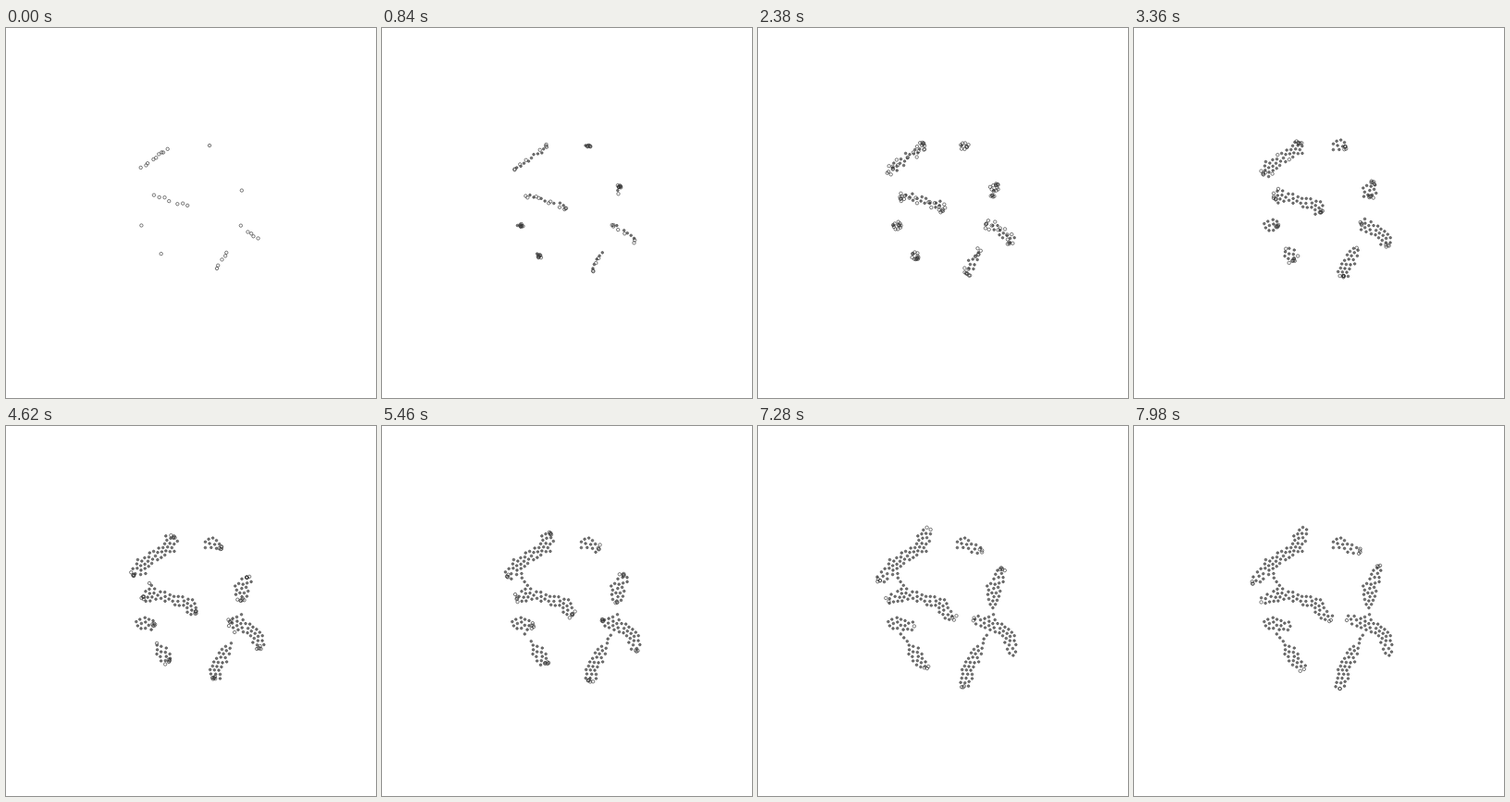
Write an HTML page with a canvas that moves like this. It is 400 by 400 pixels and loops after 8 s.

```html
<!DOCTYPE html>
<html>
<head>
<meta charset="utf-8">
<style>
html, body { margin: 0; width: 100%; height: 100%; overflow: hidden; background: #fff; }
canvas { display: block; width: 400px; height: 400px; }
</style>
</head>
<body>
<canvas id="stage"></canvas>
<script>
const LOOP = 8000, STEP = 140;
const BLOB = 7.5, BRIDGE = 5, FILL_TIME = 3200, MS_PER_PX = 280;

// Each seed swells into a blob, then grows arms towards its tips
const seeds = {
  a: { at: [146, 151], tips: [[129, 169]] },
  b: { at: [175, 131], tips: [[183, 113]] },
  c: { at: [220, 127], tips: [[245, 136]] },
  d: { at: [255, 175], tips: [[265, 151], [254, 193]] },
  e: { at: [160, 181], tips: [[141, 188]] },
  f: { at: [196, 192], tips: [[212, 210]] },
  g: { at: [147, 213], tips: [[165, 216]] },
  h: { at: [168, 244], tips: [[181, 261]] },
  i: { at: [238, 243], tips: [] },
  j: { at: [228, 260], tips: [[222, 284]] },
  k: { at: [254, 214], tips: [[234, 209]] },
  l: { at: [272, 227], tips: [[275, 246]] }
};
const bridges = ["ab", "ef", "ij", "kl"];
const threads = ["ae", "gh", "ik", "dk"];

let state = 7;
function random() {
  state = (state * 1664525 + 1013904223) % 4294967296;
  return state / 4294967296;
}
const noise = n => {
  const v = Math.sin(n * 127.1 + 11.7) * 43758.5453;
  return (v - Math.floor(v)) * 2 - 1;
};
const clamp = v => Math.max(0, Math.min(1, v));
const mix = (a, b, p) => a + (b - a) * p;
const between = (a, b, p) => [mix(a[0], b[0], p), mix(a[1], b[1], p)];
const distance = (a, b) => Math.hypot(a[0] - b[0], a[1] - b[1]);

// Growth of a colony: time to reach a distance, and the reverse
const arrival = d => d < BLOB
  ? FILL_TIME * (Math.max(0, d) / BLOB) ** 2
  : FILL_TIME + (d - BLOB) * MS_PER_PX;
const reach = t => t < FILL_TIME
  ? BLOB * Math.sqrt(t / FILL_TIME)
  : BLOB + (t - FILL_TIME) / MS_PER_PX;

const cells = [];

function addCell(x, y, birth, lead, origin) {
  if (cells.some(c => Math.hypot(c.x - x, c.y - y) < 3.8)) return;
  cells.push({ x, y, birth, lead, origin, id: cells.length });
}

// Scatter cells in a tapering capsule; plan(x, y, u, off) adds each one
function scatter(a, b, wa, wb, plan) {
  const len = distance(a, b) || 1, pad = Math.max(wa, wb);
  const cx = (b[0] - a[0]) / len, cy = (b[1] - a[1]) / len;
  const end = distance(a, b);
  for (let n = 0; n < 1500; n++) {
    const u = mix(-pad, end + pad, random());
    const v = mix(-pad, pad, random());
    const near = Math.max(0, Math.min(end, u));
    const off = Math.hypot(u - near, v);
    if (off > mix(wa, wb, near / len)) continue;
    plan(a[0] + cx * u - cy * v, a[1] + cy * u + cx * v, u, off);
  }
}

function growBlob({ at }) {
  addCell(...at, 0, 0, () => at);
  scatter(at, at, BLOB, BLOB, (x, y, u, off) =>
    addCell(x, y, arrival(off), 1500, () => at));
}

function growBridge([p, q]) {
  const a = seeds[p].at, b = seeds[q].at, len = distance(a, b);
  scatter(a, b, BRIDGE, BRIDGE, (x, y, u, off) => {
    const root = between(a, b, clamp(u / len));
    addCell(x, y, FILL_TIME * (off / BRIDGE) ** 2, 600, () => root);
  });
}

function growArms({ at, tips }) {
  for (const tip of tips) {
    const len = distance(at, tip);
    const front = t => between(at, tip, clamp(reach(t) / len));
    scatter(at, tip, 6.5, 4.5, (x, y, u) =>
      addCell(x, y, Math.max(2600, arrival(u)), 2400, front));
  }
}

function growThread([p, q]) {
  const a = seeds[p].at, b = seeds[q].at, len = distance(a, b);
  for (let u = 0; u <= len; u += 4.8) {
    const [x, y] = between(a, b, u / len);
    const d = Math.min(u, len - u), side = u < len / 2 ? 0 : 1;
    const root = between(a, b, mix(u / len, side, 0.2));
    addCell(x + noise(u), y, arrival(d), 500, () => root);
  }
}

// Push crowded neighbours apart until the packing is even
function relax(rounds) {
  for (let n = 0; n < rounds; n++) {
    cells.forEach((a, i) => {
      for (let j = 0; j < i; j++) {
        const b = cells[j];
        const dx = a.x - b.x, dy = a.y - b.y, d = Math.hypot(dx, dy);
        if (d >= 4.7) continue;
        const push = (4.7 - d) / d * 0.25;
        a.x += dx * push; a.y += dy * push;
        b.x -= dx * push; b.y -= dy * push;
      }
    });
  }
}

const all = Object.values(seeds);
all.forEach(growBlob);
bridges.forEach(growBridge);
all.forEach(growArms);
threads.forEach(growThread);
relax(20);

const canvas = document.getElementById("stage");
const scale = window.devicePixelRatio || 1;
canvas.width = canvas.height = 400 * scale;
const ctx = canvas.getContext("2d");
ctx.scale(scale, scale);

function dot(x, y, settled) {
  ctx.beginPath();
  ctx.arc(x, y, settled ? 1.3 : 1.7, 0, Math.PI * 2);
  if (settled) ctx.fill();
  ctx.strokeStyle = settled ? "#444" : "#333";
  ctx.stroke();
}

function draw(t) {
  const step = Math.round(t / STEP);
  ctx.fillStyle = "#fff";
  ctx.fillRect(0, 0, 400, 400);
  ctx.fillStyle = "#777";
  ctx.lineWidth = 0.65;
  for (const c of cells) {
    const from = Math.max(0, c.birth - c.lead);
    if (t < from) continue;
    if (t >= c.birth) {
      dot(c.x, c.y, t - c.birth > 250);
      continue;
    }
    const p = ((t - from) / (c.birth - from)) ** 5;
    const [ox, oy] = c.origin(t);
    const shake = 1.7 * (1 - p);
    dot(mix(ox, c.x, p) + noise(c.id + step * 0.37) * shake,
        mix(oy, c.y, p) + noise(c.id + step * 0.53 + 9) * shake, false);
  }
}

const began = performance.now();
function tick() {
  const t = (performance.now() - began) % LOOP;
  draw(Math.floor(t / STEP) * STEP);
  requestAnimationFrame(tick);
}
tick();
</script>
</body>
</html>
```
